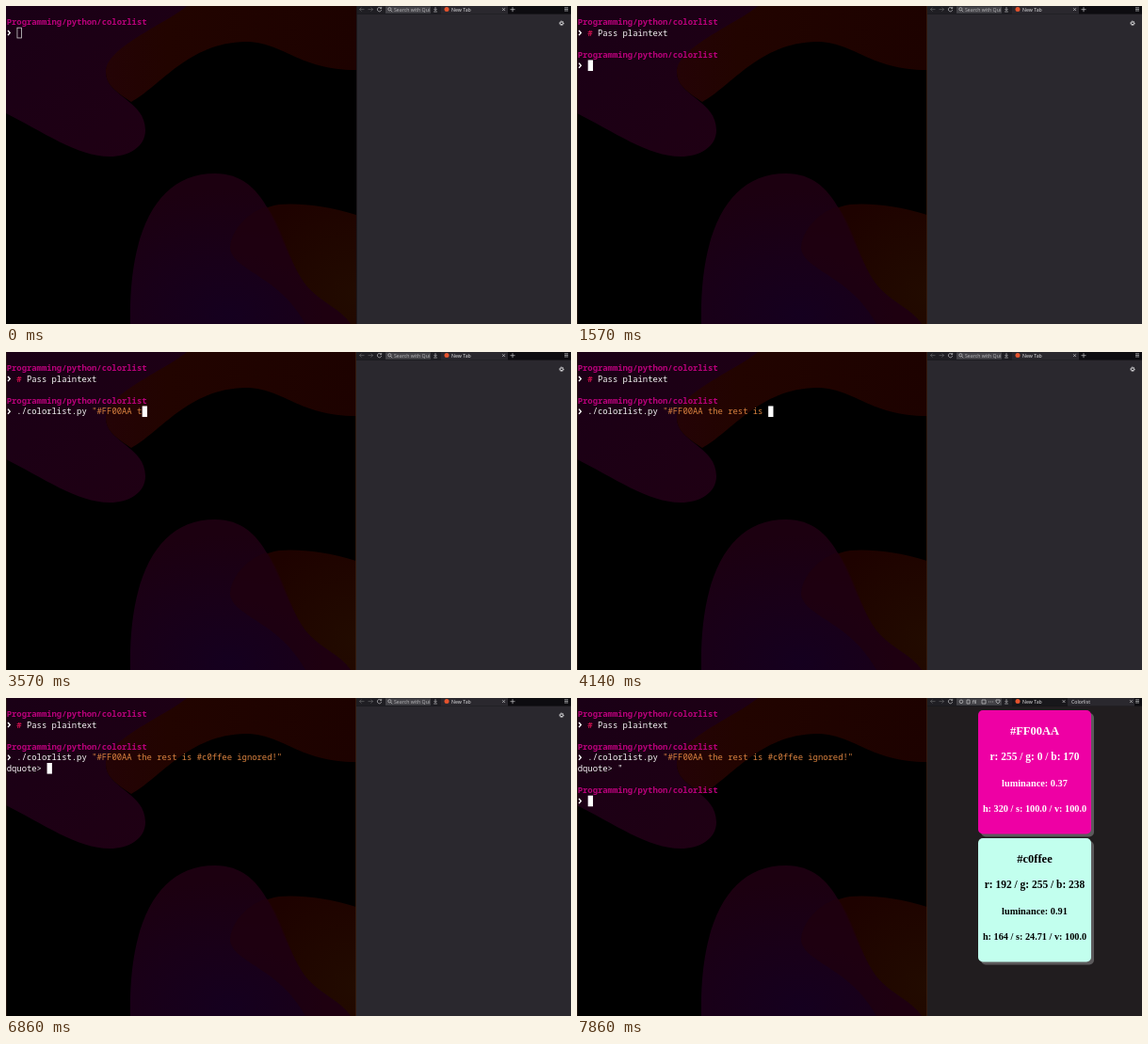
These frames come from a looping animation (600x338 px, 8 s). An HTML page:

```html
<!DOCTYPE html>
<html lang="en">
<head>
<meta charset="utf-8">
<title>colorlist</title>
<style>
  html, body { margin: 0; width: 100%; height: 100%; overflow: hidden; background: #000; }
  svg { display: block; width: 100vw; height: 100vh; }
  text { white-space: pre; }
  .term { font: 500 8.867px "Noto Sans Mono", "DejaVu Sans Mono", monospace; fill: #f8f8f8; }
  .path { font-weight: 600; fill: #b8007a; }
  .hash { font-weight: 700; fill: #c8104e; }
  .str { fill: #d9823f; }
  .ui { font: 5.2px "Noto Sans", "Open Sans", sans-serif; fill: #d8d8da; }
  .card { font-family: "Liberation Serif", serif; font-weight: 700; text-anchor: middle; }
  .icon { fill: none; stroke: #c4c4c7; stroke-width: .7; }
</style>
</head>
<body>
<svg viewBox="0 0 600 338" preserveAspectRatio="none">
  <defs>
    <linearGradient id="plum" x1="0" y1="0" x2="1" y2="1">
      <stop offset="0" stop-color="#1a0016"/><stop offset="1" stop-color="#200013"/>
    </linearGradient>
    <radialGradient id="violet" cx=".45" cy=".95" r=".85">
      <stop offset="0" stop-color="#15001f"/><stop offset=".5" stop-color="#190018"/><stop offset="1" stop-color="#1c0010"/>
    </radialGradient>
    <linearGradient id="rust" x1="0" y1="0" x2="1" y2="0">
      <stop offset="0" stop-color="#240306"/><stop offset=".25" stop-color="#220400"/><stop offset="1" stop-color="#1d0200"/>
    </linearGradient>
    <radialGradient id="ember" cx="1" cy=".75" r=".9">
      <stop offset="0" stop-color="#220b00"/><stop offset="1" stop-color="#1e0200"/>
    </radialGradient>
    <clipPath id="field"><rect x="403" y="0" width="47" height="8"/></clipPath>
    <clipPath id="left"><rect width="372" height="338"/></clipPath>
  </defs>
  <rect width="600" height="338"/>
  <g clip-path="url(#left)">
    <path fill="url(#plum)" d="M0 0H210C180 20 106 48 106 70C106 96 148 100 148 132C148 150 130 160 110 160C76 160 38 133 0 114Z"/>
    <path fill="url(#rust)" d="M372 0H192C168 20 106 44 106 70C106 86 122 94 133 102C164 85 194 39 254 38C295 38 310 68 372 68Z"/>
    <path fill="url(#ember)" d="M372 222C340 212 310 209 290 211C260 216 238 238 238 258C242 282 290 286 318 338H372Z"/>
    <path fill="url(#violet)" d="M132 338C130 242 159 178 222 178C281 178 287 250 315 292C330 314 354 320 366 338Z"/>
    <path fill="#21000d" opacity=".65" d="M277 213C255 220 238 240 238 258C242 282 290 286 318 338H366C354 320 330 314 315 292C300 268 293 235 277 213Z"/>
  </g>
  <g id="term"></g>
  <g id="browser"></g>
</svg>
<script>
const LOOP = 8000, STEPS = 56, CW = 5.32, X0 = 0.7, LINE = 11.56;
const COMMENT = '# Pass plaintext';
const COMMAND = './colorlist.py "#FF00AA the rest is #c0ffee ignored!"';
const QUOTE_AT = COMMAND.indexOf('"');

// [time, characters typed], linear in between
const commentKeys = [[143, 0], [1280, 16]];
const commandKeys = [
  [1600, 0], [2560, 15], [2840, 17], [2900, 17], [3420, 23], [4120, 36],
  [4200, 36], [4570, 37], [4800, 37], [5560, 44], [5600, 44], [5850, 50], [6140, 53]
];
const ENTER_1 = 1420, ENTER_2 = 6420, CLOSE = 6990, ENTER_3 = 7130;
const DONE = 7280, TAB = 7420, PAGE = 7560;

const term = document.getElementById('term');
const browser = document.getElementById('browser');

const rect = (x, y, w, h, fill, extra = '') =>
  `<rect x="${x}" y="${y}" width="${w}" height="${h}" fill="${fill}" ${extra}/>`;
const icon = (d, extra = '') => `<path class="icon" d="${d}" ${extra}/>`;
const label = (x, s, extra = '') => `<text class="ui" x="${x}" y="5.5" ${extra}>${s}</text>`;
const colX = col => X0 + col * CW;
const midY = row => 17 + row * LINE;
const write = (col, row, s, cls = '') =>
  `<text class="term ${cls}" x="${colX(col)}" y="${midY(row) + 3}">${s.replace(/>/g, '&gt;')}</text>`;

function typed(keys, t) {
  if (t <= keys[0][0]) return 0;
  for (let i = 1; i < keys.length; i++) {
    const [a, m] = keys[i - 1], [b, n] = keys[i];
    if (t < b) return Math.floor(m + (n - m) * (t - a) / (b - a));
  }
  return keys[keys.length - 1][1];
}

function prompt(row) {
  const y = midY(row + 1);
  return write(0, row, 'Programming/python/colorlist', 'path') +
    `<path d="M2 ${y - 2.6}L4.2 ${y}L2 ${y + 2.6}" fill="none" stroke="#fff" stroke-width="1.4"/>`;
}

function cursor(col, row, focused) {
  const x = colX(col) + .3, y = midY(row) - 5.8;
  return focused ? rect(x, y, CW, 11.6, '#fff')
    : rect(x + .3, y + .4, CW - .8, 10.8, 'none', 'stroke="#ccc" stroke-width=".8"');
}

function drawTerm(t) {
  const focused = t >= 130;
  const note = COMMENT.slice(0, typed(commentKeys, t));
  let out = prompt(0) + write(2, 1, note.slice(0, 1), 'hash') + write(3, 1, note.slice(1));
  let at = [2 + note.length, 1];
  if (t >= ENTER_1) {
    const cmd = COMMAND.slice(0, typed(commandKeys, t));
    out += prompt(3) + write(2, 4, cmd.slice(0, QUOTE_AT)) +
      write(2 + QUOTE_AT, 4, cmd.slice(QUOTE_AT), 'str');
    at = [2 + cmd.length, 4];
  }
  if (t >= ENTER_2) {
    out += write(0, 5, 'dquote> ' + (t >= CLOSE ? '"' : ''));
    at = [t >= CLOSE ? 9 : 8, 5];
  }
  if (t >= ENTER_3) at = [0, 6];
  if (t >= DONE) {
    out += prompt(7);
    at = [2, 8];
  }
  if (focused) out += rect(0, 0, .7, 338, '#2c1a12') + rect(371, 0, .8, 338, '#3a2012');
  return out + cursor(...at, focused);
}

function card(y, fill, ink, lines) {
  const sizes = [12.5, 11.45, 10.3, 10.25], base = [25.8, 53, 80.5, 108];
  return rect(429, y + 3, 120, 131.5, '#5c5a5c', 'rx="5"') +
    rect(426, y, 120, 131.5, fill, 'rx="5"') +
    lines.map((s, i) =>
      `<text class="card" x="486" y="${y + base[i]}" font-size="${sizes[i]}" fill="${ink}">${s}</text>`).join('');
}

const cross = x => icon(`M${x - 1.4} 2.2l2.8 2.8m0-2.8l-2.8 2.8`);

function drawTabs(t) {
  const two = t >= TAB, page = t >= PAGE;
  const edge = two ? 521 : 533;
  let out = rect(372, 0, 228, 8.6, '#0d0c10') + rect(372, 0, 90, 8.6, '#1f1e23') +
    rect(403, .4, 48, 7.4, '#434247') +
    icon('M380.5 3.6h-5m2-2l-2 2l2 2', 'opacity=".4"') +
    icon('M384.5 3.6h5m-2-2l2 2l-2 2', 'opacity=".4"') +
    icon('M398.4 2.4a2.2 2.2 0 1 0 .3 1.8M398.7 .9v1.8h-1.8');
  if (page) {
    out += '<circle class="icon" cx="408" cy="3.8" r="1.8"/>' +
      icon('M414 2h3v4h-3z') + label(420, 'fil') +
      icon('M430 2h4v4h-4zM437 4h1m1 0h1m1 0h1M445 2h4v2l-2 2l-2-2z');
  } else {
    out += '<circle class="icon" cx="407.4" cy="3.3" r="1.6"/>' + icon('M408.5 4.5l1.7 1.7') +
      `<g clip-path="url(#field)">${label(412, 'Search with Quilby', 'opacity=".75"')}</g>`;
  }
  out += icon('M456 1.2v3.4m-1.5-1.5l1.5 1.5l1.5-1.5M454.2 6h3.6') +
    rect(462, 0, edge - 462, 8.6, two ? '#18171b' : '#2a282e') +
    '<circle cx="468" cy="3.6" r="2.5" fill="#e5532d"/>' + label(473, 'New Tab') +
    cross(two ? 517 : 528.5);
  if (two) out += rect(521, 0, 71, 8.6, '#2a282e') + label(525, 'Colorlist') + cross(588.5);
  else out += icon('M538 1.2v5m-2.5-2.5h5');
  return out + icon('M593 1.8h4m-4 1.6h4m-4 1.6h4');
}

function drawBrowser(t) {
  let out = rect(372, 0, 228, 338, '#2a282e');
  if (t >= PAGE) {
    out += rect(372, 8, 228, 330, '#211d1f') +
      card(13, '#ee00a4', '#fff', ['#FF00AA', 'r: 255 / g: 0 / b: 170',
        'luminance: 0.37', 'h: 320 / s: 100.0 / v: 100.0']) +
      card(149, '#c2ffee', '#000', ['#c0ffee', 'r: 192 / g: 255 / b: 238',
        'luminance: 0.91', 'h: 164 / s: 24.71 / v: 100.0']);
  } else if (t < TAB) {
    out += '<circle cx="590" cy="18.3" r="2.3" fill="none" stroke="#dcdcde" stroke-width=".8" stroke-dasharray="1 .8"/>' +
      '<circle cx="590" cy="18.3" r="1.5" fill="none" stroke="#dcdcde" stroke-width="1"/>';
  }
  return out + drawTabs(t) + (t < 130 ? rect(372, 0, .8, 338, '#1a1418') : '');
}

let last = -1;
function frame(now) {
  const step = Math.floor((now % LOOP + 5) * STEPS / LOOP) % STEPS;
  if (step !== last) {
    last = step;
    const t = step * LOOP / STEPS;
    term.innerHTML = drawTerm(t);
    browser.innerHTML = drawBrowser(t);
  }
  requestAnimationFrame(frame);
}
frame(0);
</script>
</body>
</html>
```
